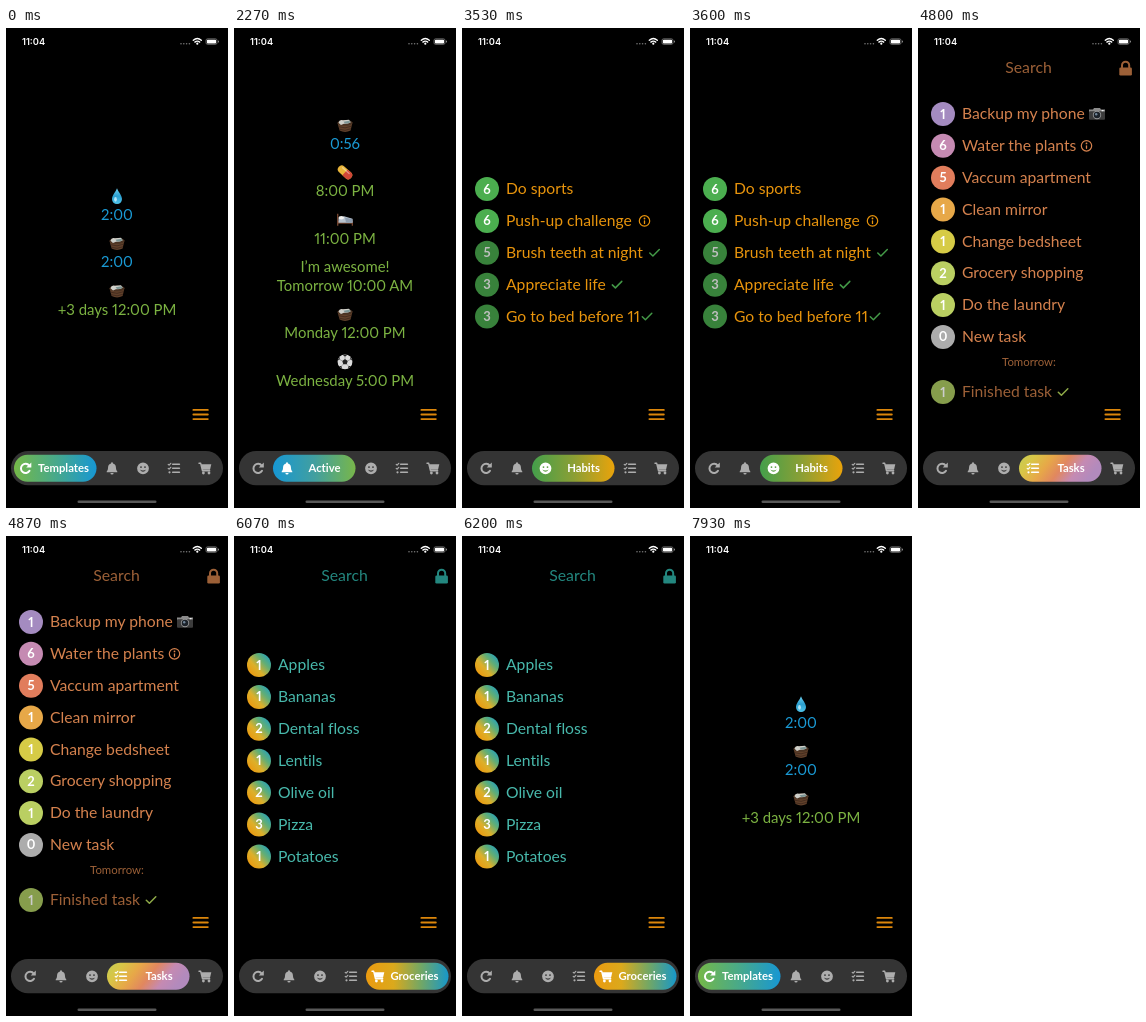
These frames come from a looping animation (222 px wide and 480 px high, 8540 ms). An HTML page:

```html
<!DOCTYPE html>
<html lang="en">
<head>
<meta charset="utf-8">
<title>Planner tabs</title>
<style>
  html, body { margin: 0; width: 100%; height: 100%; overflow: hidden; background: #000; }
  svg { display: block; width: 100%; height: 100%; }
  text {
    font-family: Lato, "Open Sans", sans-serif;
    font-variant-numeric: proportional-nums;
    font-variant-ligatures: no-common-ligatures;
  }
  .mid { text-anchor: middle; }
  .bold { font-weight: 700; }
  .line { fill: none; stroke: currentColor; stroke-linecap: round; stroke-linejoin: round; }
  .clock { font: 600 9.3px Inter, sans-serif; }
</style>
</head>
<body>
<svg id="stage" viewBox="0 0 222 480"></svg>
<script>
const LOOP = 8540;
const STEPS = [[0, 0], [2270, 1], [3530, 2], [4800, 3], [6070, 4], [7930, 0]];
const BLUE = '#1a9bd6', GREEN = '#7cb342', AMBER = '#e8940c', TEAL = '#48b9ac';
const CORAL = '#d5824e', RUST = '#9c6037';

const at = (x, y, body, color = '#fff') =>
  `<g transform="translate(${x} ${y})" color="${color}" fill="${color}">${body}</g>`;
const text = (x, y, size, color, str, cls = '') =>
  `<text x="${x}" y="${y}" font-size="${size}" fill="${color}" class="${cls}">${str}</text>`;
const line = (d, width, color = 'currentColor') =>
  `<path class="line" style="stroke:${color}" stroke-width="${width}" d="${d}"/>`;
const gradient = (id, colors, coords = 'x2="1" y2="0"') =>
  `<linearGradient id="${id}" ${coords}>${colors.map((c, i) =>
    `<stop offset="${i / (colors.length - 1)}" stop-color="${c}"/>`).join('')}</linearGradient>`;

const ICONS = {
  redo: line('M3.7 -2.7A4.6 4.6 0 1 0 4 2.5', 2) + '<path d="M5.8 -5.8V-.7H.7Z"/>',
  bell: '<path d="M0 -6Q1 -6 1 -4.8C3.5 -4.2 4 -2.3 4 0Q4 2 5.3 3.1V4H-5.3V3.1Q-4 2 -4 0C-4 -2.3 -3.5 -4.2 -1 -4.8Q-1 -6 0 -6ZM-1.6 4.7H1.6A1.6 1.6 0 0 1 -1.6 4.7Z"/>',
  smile: '<path fill-rule="evenodd" d="M-5.9 0A5.9 5.9 0 1 1 5.9 0A5.9 5.9 0 1 1 -5.9 0ZM-2.9 -1.2A.9 .9 0 1 0 -1.1 -1.2A.9 .9 0 1 0 -2.9 -1.2ZM1.1 -1.2A.9 .9 0 1 0 2.9 -1.2A.9 .9 0 1 0 1.1 -1.2ZM-3.2 1.2Q0 5.8 3.2 1.2Q0 3.4 -3.2 1.2Z"/>',
  list: line('M-1.3 -4H5.4M-1.3 0H5.4M-1.3 4H5.4', 1.6) +
    line('M-5.8 -4L-4.9 -3.1L-3.2 -5M-5.8 0L-4.9 .9L-3.2 -1', 1.2) + '<circle cx="-4.5" cy="4" r="1.1"/>',
  cart: line('M-6 -5H-4.3L-2.5 2.5H4.7', 1.4) +
    '<path d="M-4 -4H6.3L5 1.4H-2.8Z"/><circle cx="-1.6" cy="4.7" r="1.4"/><circle cx="4" cy="4.7" r="1.4"/>'
};

const EMOJI = {
  drop: '<path fill="url(#water)" d="M0 -8C1.2 -4.5 5 -.8 5 2.8A5 5 0 0 1 -5 2.8C-5 -.8 -1.2 -4.5 0 -8Z"/>' +
    '<ellipse cx="-1.5" cy="3" rx="1.4" ry="2.4" fill="#d9f5ff" opacity=".75"/>',
  basket: '<path fill="#60402a" d="M-7.5 -2.5L7.5 -3L5.6 5.3Q0 8 -5.4 5.3Z"/>' +
    line('M-6.2 1.5Q0 4 6.3 1M-5.6 4Q0 6.5 5.6 3.6', .7, '#38251a') +
    '<ellipse cy="-2.4" rx="7.5" ry="2.9" fill="#4a3323"/>' +
    '<path fill="#cfd0ca" d="M-6.5 -2.5Q-5.5 -6.3 -2 -5L4 -5.6L5.8 -3Q2 -1 -1 -1.6L-4 -.4Z"/>' +
    '<path fill="#7c9594" d="M-1.5 -3.6L4.4 -4.6L5.5 -3Q3 -1.4 0 -1.8Z"/>',
  pill: '<g transform="rotate(42)"><rect x="-8.3" y="-3.9" width="16.6" height="7.8" rx="3.9" fill="#e9b53a"/>' +
    '<path fill="#cf4637" d="M0 -3.9H4.4A3.9 3.9 0 0 1 4.4 3.9H0Z"/>' +
    '<rect x="-5.5" y="-2.5" width="10" height="1.3" rx=".6" fill="#fff" opacity=".4"/></g>',
  bed: '<path fill="#70432e" d="M-8 -6H-6.6V1H8V6H6.7V4H-6.6V6H-8Z"/>' +
    '<path fill="#b7c2ce" d="M-6.5 -1.5L-1 -3.5L7.5 -1V3H-6.5Z"/>' +
    '<ellipse cx="-3.7" cy="-2" rx="2.8" ry="1.8" fill="#f0f0ee"/><path fill="#8d9cae" d="M0 -2.4L7.5 -.6V3H1Z"/>',
  ball: '<g transform="scale(.95)"><circle r="7.8" fill="#dcdcdc"/><path fill="#222" d="M0 -3L2.9 -.9L1.8 2.5H-1.8L-2.9 -.9Z' +
    'M-2.5 -7.3H2.5L0 -5.4ZM7.7 -1.5L5.5 -2.5L5.7 -5.3ZM-7.7 -1.5L-5.5 -2.5L-5.7 -5.3ZM3.2 7L3.7 4.5L6.5 4.3ZM-3.2 7L-3.7 4.5L-6.5 4.3Z"/>' +
    line('M0 -3V-5.4M2.9 -.9L5.5 -2.5M-2.9 -.9L-5.5 -2.5M1.8 2.5L3.7 4.5M-1.8 2.5L-3.7 4.5', .6, '#777') + '</g>',
  camera: '<path fill="#8b8b8b" d="M-8 -4.5H-4L-3 -6H3L4 -4.5H8V-1H-8Z"/><rect x="-8" y="-2.8" width="16" height="8.5" rx="1" fill="#3c3c3c"/>' +
    '<circle cy="1" r="4.2" fill="#999"/><circle cy="1" r="3.3" fill="#1c2229"/><circle cx="-.8" cy=".2" r="1.2" fill="#71869a"/>' +
    '<rect x="4.6" y="-4" width="2" height="1.3" fill="#eee"/>'
};

const MARKS = {
  tick: line('M-4.7 .2L-1.6 3.2L4.8 -3.3', 1.5),
  info: '<circle r="5.2" class="line" stroke-width="1.2"/>' + line('M0 0V2.5', 1.3) + '<circle cy="-2.4" r=".9"/>',
  camera: EMOJI.camera
};

// icon, label, x of the icon and of the label while active
const TABS = [
  ['redo', 'Templates', 19.5, 57.5],
  ['bell', 'Active', 53, 90.5],
  ['smile', 'Habits', 83.5, 121.5],
  ['list', 'Tasks', 115, 153],
  ['cart', 'Groceries', 144, 180.5]
];

function nav(active) {
  const icons = TABS.map(([icon, label, iconX, textX], i) => {
    if (i !== active) return at((i < active ? 24 : 75) + 31 * i, 440.3, ICONS[icon], '#adadad');
    return `<rect x="${8 + 31 * i}" y="426.7" width="82.5" height="27" rx="13.5" fill="url(#tab${i})"/>` +
      at(iconX, 440.3, ICONS[icon]) + text(textX, 444.2, 11.3, '#fff', label, 'mid bold');
  });
  return '<rect x="5" y="423" width="212" height="34.3" rx="17.1" fill="#343434"/>' + icons.join('');
}

const timer = (y, color, label, emoji) =>
  (emoji ? at(111, y - 23.7, EMOJI[emoji]) : '') + text(111, y, 14.9, color, label, 'mid');

function row(y, count, label, fill, color, mark, markX, markColor, dim = 1) {
  return `<g opacity="${dim}"><circle cx="25" cy="${y}" r="12" fill="${fill}"/>` +
    text(25, y + 4.5, 13, '#fff', count, 'mid bold') + '</g>' +
    text(44, y + 5.2, 15.7, color, label) +
    (mark ? at(markX, y, MARKS[mark], markColor) : '');
}

const search = color => text(110.5, 45.3, 15.8, color, 'Search', 'mid') +
  at(207.6, 40.5, '<rect x="-6.3" y="-1" width="12.6" height="8" rx="1.3"/>' +
    line('M-3.6 -1V-3.2A3.6 3.6 0 0 1 3.6 -3.2V-1', 2), color);

const templates = timer(192, BLUE, '2:00', 'drop') + timer(239, BLUE, '2:00', 'basket') +
  timer(286.5, GREEN, '+3 days 12:00 PM', 'basket');

const agenda = timer(121, BLUE, '0:56', 'basket') + timer(168, GREEN, '8:00 PM', 'pill') +
  timer(215.5, GREEN, '11:00 PM', 'bed') + timer(244, GREEN, 'I’m awesome!') +
  timer(263, GREEN, 'Tomorrow 10:00 AM') + timer(310, GREEN, 'Monday 12:00 PM', 'basket') +
  timer(357.5, GREEN, 'Wednesday 5:00 PM', 'ball');

const habits = [
  [6, 'Do sports'],
  [6, 'Push-up challenge', 'info', 182.5],
  [5, 'Brush teeth at night', 'tick', 192.5],
  [3, 'Appreciate life', 'tick', 155],
  [3, 'Go to bed before 11', 'tick', 185]
].map(([n, label, mark, x], i) => row(161 + 31.9 * i, n, label, '#4bae4f', AMBER, mark, x,
  mark === 'tick' ? '#439947' : AMBER, mark === 'tick' ? .75 : 1)).join('');

const tasks = search(RUST) + [
  [1, 'Backup my phone', '#a48bc0', 'camera', 179],
  [6, 'Water the plants', '#c58ab2', 'info', 168.5],
  [5, 'Vaccum apartment', '#e17d5c'],
  [1, 'Clean mirror', '#e7a848'],
  [1, 'Change bedsheet', '#d6cb46'],
  [2, 'Grocery shopping', '#bacf62'],
  [1, 'Do the laundry', '#bacf62'],
  [0, 'New task', '#acacac']
].map(([n, label, fill, mark, x], i) => row(86 + 31.85 * i, n, label, fill, CORAL, mark, x, CORAL)).join('') +
  text(111, 337.8, 11.4, RUST, 'Tomorrow:', 'mid') +
  row(364, 1, 'Finished task', '#a8c560', RUST, 'tick', 145, '#8faa48', .8);

const groceries = search('#23877f') + [
  [1, 'Apples'], [1, 'Bananas'], [2, 'Dental floss'], [1, 'Lentils'],
  [2, 'Olive oil'], [3, 'Pizza'], [1, 'Potatoes']
].map(([n, label], i) => row(129 + 31.9 * i, n, label, 'url(#fruit)', TEAL)).join('');

const defs = '<defs>' +
  gradient('water', ['#6fd0ee', '#2b9fd0', '#51c4ea'], 'x2="0" y2="1"') +
  gradient('tab0', ['#75b848', '#48a98a', '#1797d3']) +
  gradient('tab1', ['#1797d3', '#419fa0', '#78b64a']) +
  gradient('tab2', ['#449f4b', '#8a9f35', '#e9a30b']) +
  gradient('tab3', ['#c4cd55', '#d9c546', '#e7a848', '#e1875f', '#c58ab2', '#b28abd'], 'x2="1" y2=".25"') +
  gradient('tab4', ['#eb9a10', '#dba91c', '#72a765', '#1797c9']) +
  gradient('fruit', ['#eb9a10', '#dcb02b', '#62ae75', '#1f9fc0'], 'x1=".1" y1=".85" x2=".95" y2=".1"') +
  '</defs>';

const status = text(16, 16.8, 9.3, '#fff', '11:04', 'clock') +
  [0, 1, 2, 3].map(i => `<circle cx="${175 + 2.8 * i}" cy="15.8" r=".8" fill="#777"/>`).join('') +
  at(191.3, 13.5, line('M-4 -1.3Q0 -4.7 4 -1.3M-2.4 .6Q0 -1.4 2.4 .6', 1.4) + '<circle cy="2.2" r="1.1"/>') +
  '<rect x="200" y="10.8" width="11" height="5.6" rx="1.6" fill="none" stroke="#888" stroke-width=".7"/>' +
  '<rect x="200.9" y="11.7" width="9.2" height="3.8" rx=".8" fill="#fff"/>' +
  '<rect x="212" y="12.6" width="1" height="2" rx=".5" fill="#888"/>';

const menu = at(194.6, 386.5, line('M-7.2 -4.6H7.2M-7.2 0H7.2M-7.2 4.6H7.2', 1.9), '#dc860b');
const homeBar = '<rect x="71.5" y="472.4" width="79" height="2.7" rx="1.3" fill="#585858"/>';

const stage = document.getElementById('stage');
stage.innerHTML = defs + '<rect width="222" height="480"/>' + status +
  [templates, agenda, habits, tasks, groceries].map((body, i) =>
    `<g class="scene" visibility="hidden">${body}${nav(i)}</g>`).join('') + menu + homeBar;

const scenes = [...stage.querySelectorAll('.scene')];
const start = performance.now();

function draw() {
  const t = Math.max(0, performance.now() - start) % LOOP;
  const current = STEPS.filter(([from]) => from <= t).pop()[1];
  scenes.forEach((scene, i) => scene.setAttribute('visibility', i === current ? 'visible' : 'hidden'));
  requestAnimationFrame(draw);
}
draw();
</script>
</body>
</html>
```
